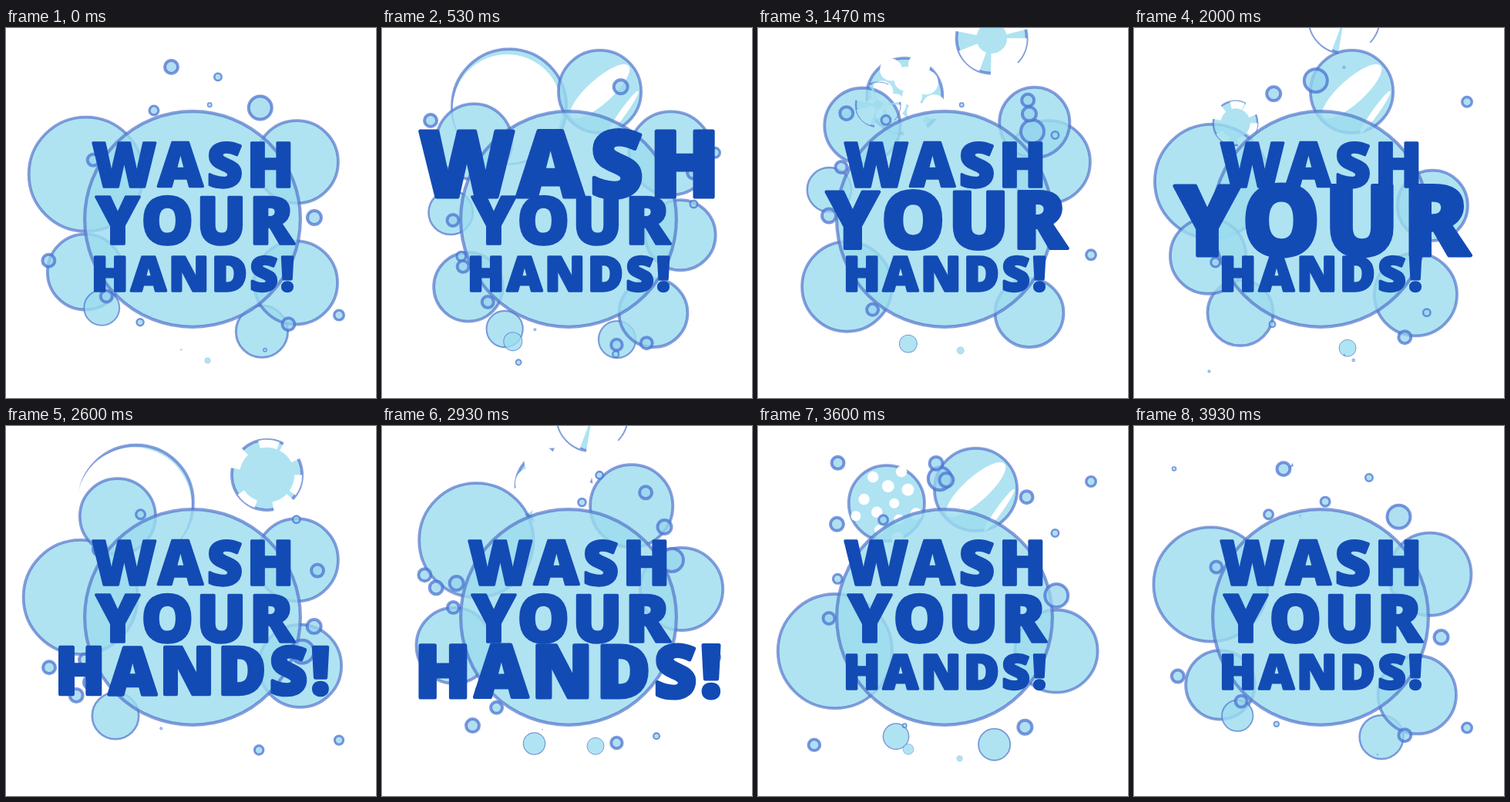
An HTML page with a canvas for the animation above (3990 ms loop, 480 px wide and 480 px high).

```html
<!DOCTYPE html>
<html lang="en">
<head>
<meta charset="utf-8">
<title>Wash your hands</title>
<style>
  html, body { margin: 0; width: 100%; height: 100%; overflow: hidden; background: #fff; }
  canvas, svg { position: absolute; left: 0; top: 0; width: 480px; height: 480px; }
  text {
    font-family: "Open Sans", "Noto Sans", sans-serif; font-weight: 800; text-anchor: middle;
    fill: #134bb5; stroke: #134bb5; stroke-width: 3.4; stroke-linejoin: round;
  }
</style>
</head>
<body>
<canvas id="stage" width="480" height="480"></canvas>
<svg viewBox="0 0 480 480">
  <g data-x="242" data-y="177.5"><text x="245.5" y="205.5" font-size="80" letter-spacing="5.5">WASH</text></g>
  <g data-x="247" data-y="248.5"><text x="247" y="279.5" font-size="85" letter-spacing="4">YOUR</text></g>
  <g data-x="244" data-y="318"><text x="244.3" y="340.5" font-size="62.5" letter-spacing="3.6">HANDS!</text></g>
</svg>
<script>
const LOOP = 3990, STEPS = 60, TAU = Math.PI * 2, RAD = Math.PI / 180;
const CX = 242, CY = 248, LEFT = -1, RIGHT = 1;
const FILL = 'rgba(156,221,239,.8)', LINE = 'rgba(78,112,203,.68)';

const ctx = document.getElementById('stage').getContext('2d');
const layer = document.createElement('canvas');
layer.width = layer.height = 480;
const tmp = layer.getContext('2d');
const clamp = v => Math.min(1, Math.max(0, v));

function disc(c, x, y, r) {
  c.beginPath();
  c.arc(x, y, Math.max(r, 0), 0, TAU);
}

// Each burst eats holes into a bubble; k counts steps since it began.
const bursts = {
  spots(c, x, y, r, k) {
    for (let i = 0; i < 12; i++) {
      const d = Math.sqrt((i + .5) / 12) * r * .95, a = i * 2.4;
      disc(c, x + d * Math.cos(a), y + d * Math.sin(a), r * (.2 + .02 * (i % 3 - 1)) * Math.sqrt(k));
      c.fill();
    }
  },
  ring(c, x, y, r, k) {
    const n = 6, span = TAU / n * Math.min(.93, .45 + .07 * k), inner = Math.max(0, .97 - .11 * k);
    for (let i = 0; i < n; i++) {
      const a = i * TAU / n + .3 * Math.sin(i * 5), outer = i % 2 ? 1.05 : .96;
      c.lineWidth = r * (outer - inner);
      c.beginPath();
      c.arc(x, y, r * (outer + inner) / 2, a, a + span);
      c.stroke();
    }
  },
  crescent(c, x, y, r, k) {
    disc(c, x - .035 * r, y + .045 * r, r * Math.min(.98, k / 4.3));
    c.fill();
  },
  slash(c, x, y, r, k) {
    c.beginPath();
    c.ellipse(x, y, r * Math.min(1.05, .75 + .1 * k), r * .19 * k, -.73, 0, TAU);
    c.fill();
    c.beginPath();
    c.ellipse(x + .55 * r, y + .48 * r, r * .6, r * .05 * k, -.95, 0, TAU);
    c.fill();
  }
};

// A kind of bubble circles from the bottom (0 degrees) to the top (180).
// starts: steps at which one sets off; from: angle then; speed, drag: degrees per step;
// w, h: half axes of the orbit; bow: 1 follows the ellipse, 0 rises straight.
const big = [
  { side: LEFT, starts: [19.6, 30, 49], size: 76, grow: 70, from: 48, speed: 5.9, drag: .04, w: 147, h: 172, burst: 'crescent', at: 15 },
  { side: LEFT, starts: [2, 5.7, 22, 35.5, 53], size: 51, grow: 60, from: 20, speed: 6.9, w: 152, h: 170, burst: 'spots', at: 18 },
  { side: LEFT, starts: [9, 57], size: 30, grow: 58, from: 36.5, speed: 5.75, drag: .06, w: 153, h: 180, burst: 'ring', at: 18 },
  { side: RIGHT, starts: [6, 23, 30, 44], size: 55.5, grow: 46, from: 15, speed: 6.15, w: 150, h: 172, burst: 'slash', at: 22.5 },
  { side: RIGHT, starts: [1, 15, 55], size: 47.5, grow: 46, from: 14, speed: 5.4, w: 146, h: 185, flare: .55, burst: 'ring', at: 22 },
  { side: RIGHT, starts: [52], size: 56, grow: 56, from: 15.5, speed: 6.25, w: 150, h: 183, burst: 'spots', at: 22 }
];
const small = [
  { side: RIGHT, starts: [6, 30, 42], size: 17, from: 13.5, speed: 7.05, w: 147, h: 180 },
  { side: RIGHT, starts: [16.8, 39, 58], size: 8, from: 38, speed: 7.6, w: 190, h: 195, bow: 0 },
  { side: RIGHT, starts: [8.5, 30, 40.4, 59], size: 10, from: 43, speed: 7, w: 170, h: 200, end: 148 },
  { side: RIGHT, starts: [15, 38, 58.5], size: 11, from: 79, speed: 7.7, w: 158, h: 190 },
  { side: RIGHT, starts: [3, 13.8, 30, 45.8], size: 6, from: 52, speed: 8.7, w: 163, h: 185, bow: .6 },
  { side: LEFT, starts: [7.7, 13.5, 30, 45.7, 50], size: 7.5, from: 70, speed: 9.8, drag: .1, w: 147, h: 150 },
  { side: LEFT, starts: [38.5, 59], size: 10, from: 70, speed: 6.2, w: 188, h: 205, bow: .2 },
  { side: LEFT, starts: [13, 39, 45.8], size: 10.5, from: 62, speed: 7.6, w: 175, h: 200 },
  { side: LEFT, starts: [18.5, 39], size: 11, from: 64, speed: 7.8, w: 150, h: 178 },
  { side: LEFT, starts: [2.5, 6.8, 22, 33, 44, 58], size: 9.5, from: 41.5, speed: 4.8, w: 150, h: 150, end: 130 }
];

// Angle after t steps: slightly slower near the bottom and the top.
function angle({ from, speed, drag = 0 }, t) {
  const a = from + speed * t - drag * t * Math.abs(t);
  return a - 3 * Math.sin(2 * a * RAD);
}

function place({ side, w, h, bow = 1, flare = 0 }, a) {
  const out = 1 + flare * Math.max(0, a - 125) / 60;
  const s = Math.sin(a * RAD), reach = Math.sign(s) * Math.abs(s) ** bow;
  return [CX + side * w * reach * out, CY + h * Math.cos(a * RAD) * out];
}

function eachBubble(kinds, step, draw) {
  for (const kind of kinds) {
    for (const start of kind.starts) {
      // Ages run from 15 steps before the key pose to 45 after it.
      const t = ((step - start + 15) % STEPS + STEPS) % STEPS - 15;
      draw(kind, t, angle(kind, t));
    }
  }
}

function bubble(c, x, y, r, w, fill, line) {
  disc(c, x, y, r - w / 2);
  c.fillStyle = fill;
  c.fill();
  c.lineWidth = w;
  c.strokeStyle = line;
  c.stroke();
}

function drawBig(kind, t, a) {
  const k = t - kind.at, life = kind.burst === 'ring' ? 8 : 5.7;
  const r = kind.size * clamp((a - 4) / kind.grow);
  if (r < .5 || k > life) return;
  const [x, y] = place(kind, a), w = 3.8 * Math.min(1, r / 45);
  if (k <= 0) return bubble(ctx, x, y, r, w, FILL, LINE);
  tmp.clearRect(0, 0, 480, 480);
  bubble(tmp, x, y, r, w, FILL, LINE);
  tmp.globalCompositeOperation = 'destination-out';
  tmp.fillStyle = tmp.strokeStyle = '#000';
  bursts[kind.burst](tmp, x, y, r, k);
  tmp.globalCompositeOperation = 'source-over';
  ctx.drawImage(layer, 0, 0);
}

function drawSmall(kind, t, a) {
  const { size, end = 186 } = kind;
  const r = size * clamp((a - 10) / 28) * clamp((end + 5 - a) / 5);
  if (r < .5) return;
  const [x, y] = place(kind, a);
  bubble(ctx, x, y, r, Math.min(4, r * .42), 'rgba(150,212,238,.75)', 'rgba(72,112,208,.72)');
}

// The words swell one after another, hold and shrink back.
const words = [...document.querySelectorAll('g')].map((el, i) =>
  ({ el, x: +el.dataset.x, y: +el.dataset.y, peak: 733 + i * 1067 }));

function pulse({ el, x, y, peak }, ms) {
  const k = 1 + .51 * clamp((440 - Math.abs(ms - peak)) / 250);
  el.setAttribute('transform', `translate(${x} ${y}) scale(${k}) translate(${-x} ${-y})`);
}

function render(now) {
  // 15 steps a second, each beginning on a whole 10 ms.
  const ms = Math.floor(now % LOOP / 10) * 10;
  const step = Math.floor((ms + 3.4) * .015);
  ctx.clearRect(0, 0, 480, 480);
  eachBubble(big, step, drawBig);
  bubble(ctx, CX, CY, 142, 4.2, FILL, LINE);
  eachBubble(small, step, drawSmall);
  for (const w of words) pulse(w, step * 200 / 3);
}

const begin = performance.now();
function tick() {
  render(performance.now() - begin);
  requestAnimationFrame(tick);
}
tick();
</script>
</body>
</html>
```
